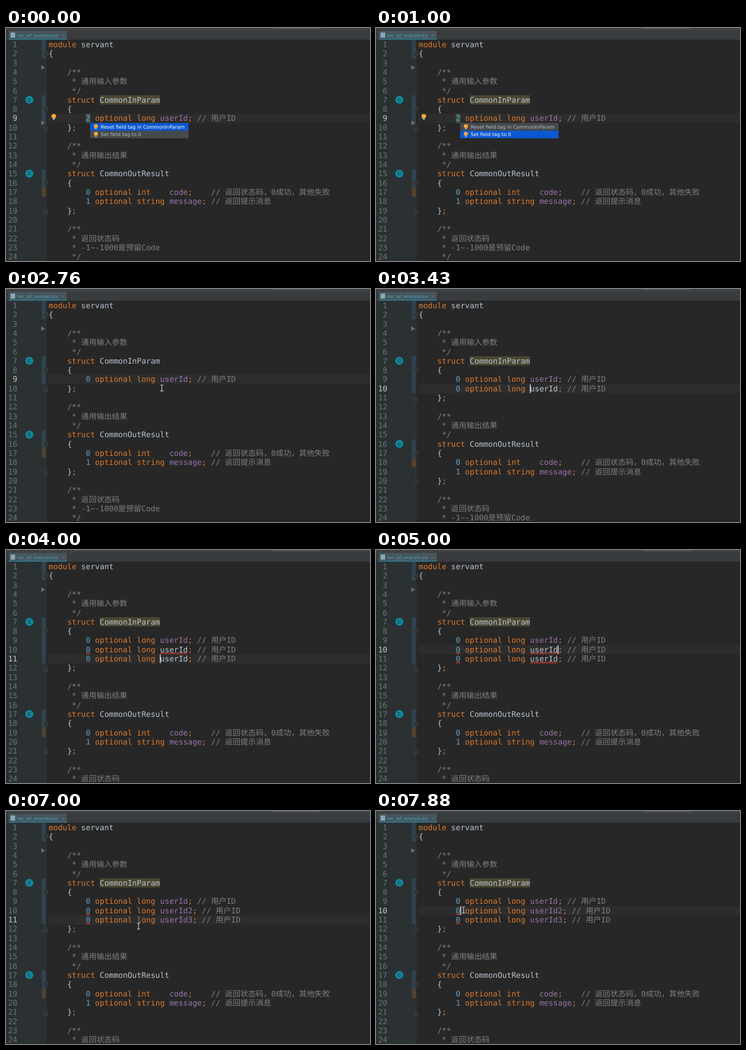
These frames come from a looping animation (640 px wide and 412 px high, 8000 ms). An HTML page:

```html
<!DOCTYPE html>
<html lang="zh">
<head>
<meta charset="utf-8">
<title>Field tag editing</title>
<style>
  html, body { margin: 0; width: 100%; height: 100%; overflow: hidden; background: #272727; }
  svg { display: block; width: 640px; height: 412px; text-rendering: geometricPrecision; }
  .code { font: 13.56px "DejaVu Sans Mono", "Noto Sans CJK SC", "Noto Sans CJK", monospace; white-space: pre; }
  .menu { font: 8.5px "DejaVu Sans", sans-serif; }
  .tab { font: 8px "Liberation Sans", sans-serif; }
  .icon { font: bold 8.5px "Liberation Sans", sans-serif; }
</style>
</head>
<body>
<svg id="stage" viewBox="0 0 640 412"></svg>
<script>
const LOOP = 8000;
const LEFT = 75, COL = 8.16, ROW = 16.32, TOP = 21;
const stage = document.getElementById("stage");

const colX = col => LEFT + col * COL;
const rowY = row => TOP + (row - 1) * ROW;
const baseY = row => rowY(row) + 12.9;

const el = (name, attrs, body = "") =>
  `<${name} ${Object.entries(attrs).map(([k, v]) => `${k}="${v}"`).join(" ")}>${body}</${name}>`;
const rect = (x, y, width, height, fill) => el("rect", { x, y, width, height, fill });
const text = (x, y, fill, body, cls = "code", anchor = "start") =>
  el("text", { x, y, fill, class: cls, "text-anchor": anchor }, body);
const path = (d, stroke, width = 1, fill = "none") =>
  el("path", { d, stroke, "stroke-width": width, fill });

// Each step changes only the listed parts of the editor state.
// plain: rows whose name has no field colour; waves: rows marked as duplicates.
const STEPS = [
  { t: 0, tag: 2, menu: 0, names: ["userId"], row: 9, col: null, usage: true, plain: [], tagWaves: [], nameWaves: [] },
  { t: 550, menu: 1 },
  { t: 1770, menu: null, tag: 0, usage: false },
  { t: 2220, col: 24 },
  { t: 2870, usage: true },
  { t: 3110, names: ["userId", "userId"], row: 10, plain: [10] },
  { t: 3450, tagWaves: [10], nameWaves: [10] },
  { t: 3770, names: ["userId", "userId", "userId"], row: 11, plain: [10, 11] },
  { t: 4220, tagWaves: [10, 11], nameWaves: [10, 11] },
  { t: 4440, row: 10 },
  { t: 4700, col: 30 },
  { t: 5330, names: ["userId", "userId2", "userId"], col: 31 },
  { t: 5540, plain: [11], nameWaves: [11] },
  { t: 5760, row: 11, col: 30 },
  { t: 6330, names: ["userId", "userId2", "userId3"], col: 31 },
  { t: 6660, plain: [], nameWaves: [] },
  { t: 7500, row: 10, col: 9 }
];

// Pointer paths: [time, x, y]
const POINTER = [
  [[1880, 330, 215], [2220, 274, 163], [2550, 274, 175], [3110, 274, 175]],
  [[6770, 262, 214], [7450, 154, 175], [8000, 154, 175]]
];

const COLORS = {
  comment: "#808080", keyword: "#dc7a2c", number: "#609fc6",
  field: "#9876aa", plain: "#b9c6d2"
};
const TOKEN = /(?<comment>\/\/.*|\/\*\*|\*.*)|(?<keyword>\b(?:module|struct|optional|long|int|string)\b|;)|(?<number>\b\d+\b)|(?<field>\b(?:userId\d?|code|message)\b)|(?<plain>[\w{}]+)/g;

function sourceLines(s) {
  const doc = title => ["    /**", `     * ${title}`, "     */"];
  return [
    "module servant", "{", "", ...doc("通用输入参数"),
    "    struct CommonInParam", "    {",
    ...s.names.map((name, i) => `        ${i ? 0 : s.tag} optional long ${name}; // 用户ID`),
    "    };", "", ...doc("通用输出结果"),
    "    struct CommonOutResult", "    {",
    "        0 optional int    code;    // 返回状态码，0成功，其他失败",
    "        1 optional string message; // 返回提示消息",
    "    };", "", "    /**", "     * 返回状态码", "     * -1~-1000是预留Code", "     */"
  ].slice(0, 24);
}

function codeLine(line, row, s) {
  let out = "";
  for (const m of line.matchAll(TOKEN)) {
    const kind = Object.keys(COLORS).find(k => m.groups[k] !== undefined);
    const plain = kind === "field" && s.plain.includes(row);
    out += text(colX(m.index), baseY(row), plain ? COLORS.plain : COLORS[kind], m[0]);
  }
  return out;
}

function wave(row, col, len) {
  const x = colX(col), y = baseY(row) + 3;
  let d = `M${x} ${y}`;
  for (let i = 1; i * 2 <= len * COL; i++) d += `L${x + i * 2} ${y + (i % 2 ? -1.8 : 0)}`;
  return path(d, "#d23c3c", 1.2);
}

const bulb = (x, y, r) =>
  el("circle", { cx: x, cy: y - 1, r, fill: "#f2a73b" }) +
  rect(x - r / 2, y + r - 1, r, 2, "#a9a9a4");

function classIcon(row) {
  const y = rowY(row) + 8;
  return el("circle", { cx: 41, cy: y, r: 7, fill: "#0f8aa0" }) +
    text(41, y + 3, "#26383d", "C", "icon", "middle");
}

function foldMark(row, closing) {
  const y = rowY(row) + 9, k = closing ? -1 : 1;
  return path(`M66.5 ${y - 4 * k}h7v${5 * k}l-3.5 ${3 * k}l-3.5 ${-3 * k}z`, "#484c4e", 0.9, "#292b2c") +
    path(`M68.5 ${y - k}h3`, "#5c6062", 0.8);
}

const triangle = y => path(`M62 ${y - 4}v8l7 -4z`, "none", 0, "#6b6e70");

function tabBar() {
  return rect(0, 0, 640, 20.5, "#393c3e") +
    rect(0, 0, 640, 4.5, "#3f4244") +
    rect(470, 0, 83, 2, "#515456") +
    rect(5, 5, 102, 14, "#47555b") +
    rect(5, 19, 102, 1.5, "#2b8299") +
    rect(8, 8, 8, 9, "#87a9b5") +
    text(19.5, 15.5, "#459fbd", "her_taf_example.jce", "tab") +
    path("M98 11l4 4m0 -4l-4 4", "#66757b", 0.8);
}

function gutter(s) {
  const extra = s.names.length - 1;
  const bar = (from, to, fill) => rect(63, rowY(from), 7, (to - from + 1) * ROW, fill);
  let out = rect(0, 20, 71, 392, "#2b3133") + path("M70.5 21V412", "#35393b", 0.8);
  out += bar(1, 2, "#30424f") + bar(7, 9 + extra, "#30424f") + bar(15 + extra, 16 + extra, "#30424f");
  out += bar(17 + extra, 17 + extra, "#52422d");
  for (let row = 1; row <= 24; row++)
    out += text(20, baseY(row), row === s.row ? "#c3c6c7" : "#697377", row, "code", "end");
  out += classIcon(7) + classIcon(15 + extra);
  for (const row of [2, 8, 16 + extra]) out += foldMark(row, false);
  for (const row of [10 + extra, 19 + extra]) out += foldMark(row, true);
  out += triangle(70);
  if (s.menu !== null) out += triangle(168);
  return out;
}

function menu(s) {
  const items = ["Reset field tag in CommonInParam", "Set field tag to 0"];
  let out = rect(148, 168, 173, 27, "#45494b");
  items.forEach((label, i) => {
    const y = 168 + i * 13.5, on = s.menu === i;
    if (on) out += rect(148, y, 173, 13.5, "#0c58cf");
    out += bulb(158, y + 6.5, 3.6) + text(166.5, y + 9.8, on ? "#ffffff" : "#bcbec0", label, "menu");
  });
  return out + bulb(84, 157, 4);
}

function editor(s) {
  let out = rect(0, 0, 640, 412, "#272727") + gutter(s);
  out += rect(LEFT, rowY(s.row), 565, ROW, "#2d2d2d");
  if (s.usage) out += rect(colX(11), rowY(7), 13 * COL, ROW, "#4a4631");
  if (s.menu !== null) out += rect(colX(8), rowY(9), COL, ROW, "#3d5548");
  sourceLines(s).forEach((line, i) => { out += codeLine(line, i + 1, s); });
  for (const row of s.tagWaves) out += wave(row, 8, 1);
  for (const row of s.nameWaves) out += wave(row, 24, 6);
  out += tabBar();
  if (s.menu !== null) out += menu(s);
  return out;
}

function pointerAt(t) {
  for (const keys of POINTER)
    for (let i = 1; i < keys.length; i++) {
      const [t0, x0, y0] = keys[i - 1], [t1, x1, y1] = keys[i];
      if (t >= t0 && t < t1) {
        const p = (t - t0) / (t1 - t0), e = p * p * (3 - 2 * p);
        return [x0 + (x1 - x0) * e, y0 + (y1 - y0) * e];
      }
    }
  return null;
}

stage.innerHTML = `<g id="editor"></g><rect id="caret" width="1.5" height="15.5" fill="#e0e0e0"/>` +
  `<g id="pointer">${path("M-2.5 -5.5Q0 -5.5 0 -4V4Q0 5.5 -2.5 5.5M2.5 -5.5Q0 -5.5 0 -4V4Q0 5.5 2.5 5.5", "#e4e4e4", 1.1)}</g>`;
const [view, caret, pointer] = ["editor", "caret", "pointer"].map(id => document.getElementById(id));

const states = [];
STEPS.forEach((step, i) => {
  const prev = states[i - 1] || {};
  const s = { ...prev, ...step };
  s.moved = "row" in step || "col" in step ? step.t : prev.moved;
  states.push(s);
});

let shown = null;
function frame() {
  const t = performance.now() % LOOP;
  const s = states.findLast(state => state.t <= t);
  if (s !== shown) {
    view.innerHTML = editor(s);
    shown = s;
  }
  const lit = s.col !== null && (t - s.moved) % 1000 < 500;
  caret.setAttribute("visibility", lit ? "visible" : "hidden");
  if (lit) {
    caret.setAttribute("x", colX(s.col) - 0.3);
    caret.setAttribute("y", rowY(s.row) + 0.5);
  }
  const pos = pointerAt(t);
  pointer.setAttribute("visibility", pos ? "visible" : "hidden");
  if (pos) pointer.setAttribute("transform", `translate(${pos})`);
  requestAnimationFrame(frame);
}
frame();
</script>
</body>
</html>
```
